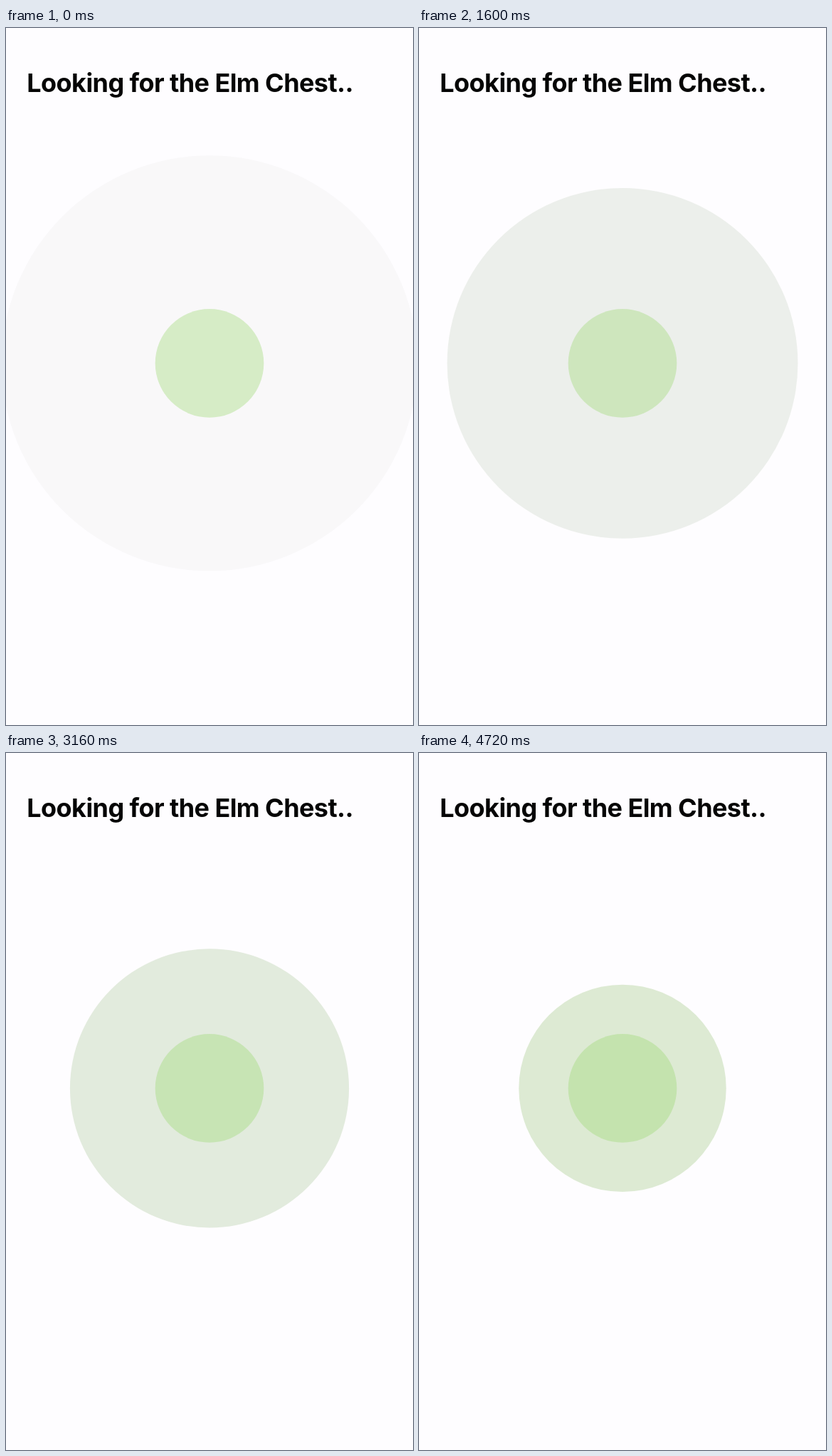
Recreate the animation shown at these times as an HTML page. Size 572 by 980 pixels, loop 4.76 s.

```html
<!DOCTYPE html>
<html lang="en">
<head>
<meta charset="utf-8">
<title>Searching pulse</title>
<style>
  html, body {
    margin: 0;
    width: 100%;
    height: 100%;
    overflow: hidden;
    background: #fefdff;
  }
  svg {
    display: block;
    width: 572px;
    height: 980px;
  }
  text {
    font: 700 36px Inter, "Liberation Sans", sans-serif;
    letter-spacing: -0.016em;
    fill: #050505;
  }
</style>
</head>
<body>
<svg viewBox="0 0 572 980">
  <text x="29.3" y="90">Looking for the Elm Chest..</text>
  <circle id="pulse" cx="286" cy="471.4" r="76.3"/>
  <circle cx="286" cy="471.4" r="76.3" fill="rgb(156 215 114 / 0.38)"/>
</svg>
<script>
  const LOOP = 4760;
  const PERIOD = 2000;
  const PHASE = 1886.5; // how far into a pulse the loop begins
  const RADIUS = 76.3;
  const GROWTH = 3;
  const GREEN = [156, 215, 114];
  const ALPHA = 0.4;
  const GAMMA = 2.2;

  const pulse = document.getElementById("pulse");
  let start;

  // Fades towards transparent black, blending channels in linear light.
  function fade(p) {
    const dim = (1 - p) ** (1 / GAMMA);
    const rgb = GREEN.map(c => (c * dim).toFixed(2)).join(" ");
    return `rgb(${rgb} / ${(ALPHA * (1 - p)).toFixed(4)})`;
  }

  function draw(now) {
    start ??= now;
    const t = (now - start) % LOOP;
    const p = ((t + PHASE) % PERIOD) / PERIOD;
    pulse.setAttribute("r", RADIUS * (1 + GROWTH * p));
    pulse.setAttribute("fill", fade(p));
    requestAnimationFrame(draw);
  }

  requestAnimationFrame(draw);
</script>
</body>
</html>
```
